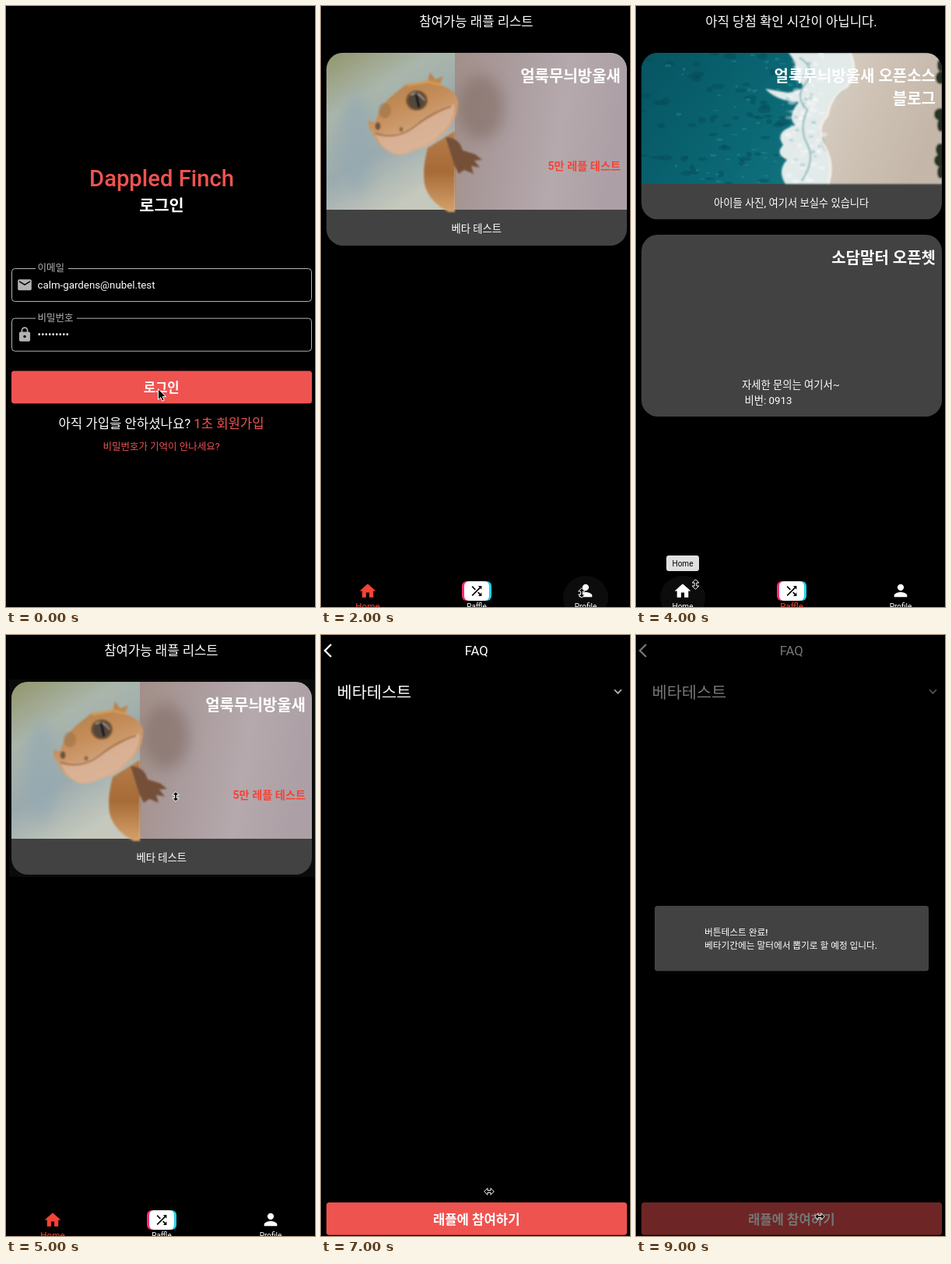
Recreate the animation shown at these times as an HTML page. Size 397 by 770 pixels, loop 10 s.

```html
<!DOCTYPE html>
<html lang="ko">
<head>
<meta charset="utf-8">
<title>Raffle app</title>
<style>
  html, body { margin: 0; width: 100%; height: 100%; overflow: hidden; background: #000; }
  svg { display: block; width: 100%; height: 100%; }
  text { font-family: Roboto, "Noto Sans CJK KR", "Noto Sans CJK", sans-serif; white-space: pre; }
</style>
</head>
<body>
<svg id="stage" viewBox="0 0 397 770"></svg>
<script>
const RED = '#ef5350', ACCENT = '#f44336', GRAY = '#424242', HINT = '#b3b3b3';
const APP = 'Dappled Finch', EMAIL = 'calm-gardens@nubel.test';
const BIRD = '얼룩무늬방울새', CHAT = '소담말터';

const ICONS = {
  mail: 'M20 4H4c-1.1 0-2 .9-2 2v12c0 1.1.9 2 2 2h16c1.1 0 2-.9 2-2V6c0-1.1-.9-2-2-2zm0 4l-8 5-8-5V6l8 5 8-5v2z',
  lock: 'M18 8h-1V6A5 5 0 0 0 7 6v2H6c-1.1 0-2 .9-2 2v10c0 1.1.9 2 2 2h12c1.1 0 2-.9 2-2V10c0-1.1-.9-2-2-2zm-6 9a2 2 0 1 1 0-4 2 2 0 0 1 0 4zm3.1-9H8.9V6a3.1 3.1 0 0 1 6.2 0z',
  home: 'M10 20v-6h4v6h5v-8h3L12 3 2 12h3v8z',
  person: 'M12 12a4 4 0 1 0 0-8 4 4 0 0 0 0 8zm0 2c-2.67 0-8 1.34-8 4v2h16v-2c0-2.66-5.33-4-8-4z',
  shuffle: 'M10.6 9.2 5.4 4 4 5.4l5.2 5.2zM14.5 4l2 2L4 18.6 5.4 20 18 7.5l2 2V4zm.3 9.4-1.4 1.4 3.1 3.1-2 2.1H20v-5.5l-2 2z'
};

const rect = (x, y, w, h, fill, r = 0, extra = '') =>
  `<rect x="${x}" y="${y}" width="${w}" height="${h}" rx="${r}" fill="${fill}" ${extra}/>`;
const path = (d, fill, extra = '') => `<path d="${d}" fill="${fill}" ${extra}/>`;
const line = (d, color, width) => path(d, 'none', `stroke="${color}" stroke-width="${width}"`);
const oval = (x, y, rx, ry, fill, extra = '') =>
  `<ellipse cx="${x}" cy="${y}" rx="${rx}" ry="${ry}" fill="${fill}" ${extra}/>`;
const icon = (name, cx, cy, scale, fill) =>
  path(ICONS[name], fill, `transform="translate(${cx} ${cy}) scale(${scale}) translate(-12 -12)"`);

function text(x, y, size, str, { fill = '#fff', weight = 400, anchor = 'middle' } = {}) {
  return `<text x="${x}" y="${y}" font-size="${size}" fill="${fill}" font-weight="${weight}" text-anchor="${anchor}">${str}</text>`;
}
const left = { anchor: 'start' };
const heading = (y, str) => text(385, y, 20, str, { anchor: 'end', weight: 700 });
const appBar = str => text(199.5, 26, 16.7, str);
const button = (y, str, fill = RED) =>
  rect(7, y, 386, 41.7, fill, 3.5) + text(199.7, y + 27.6, 16.7, str, { weight: 700 });

// Mouse pointers
const pointer = (d, x, y, turn = 0) =>
  path(d, '#000', `stroke="#fff" stroke-linejoin="round" transform="translate(${x} ${y}) rotate(${turn})"`);
const arrow = (x, y) => pointer('M0 0V14l3.3-3 2 4.7 2.4-1L5.7 10H10Z', x, y);
const resize = (x, y, turn) => pointer('M0-6.3 4.3-2H1.3V2H4.3L0 6.3-4.3 2h3V-2h-3Z', x, y, turn);

function nav(selected, hovered) {
  const xs = { Home: 60, Raffle: 200, Profile: 340 };
  const color = name => name === selected ? ACCENT : '#fff';
  const halo = hovered ? oval(xs[hovered], 758, 29, 28, '#0c0c0c') : '';
  const labels = Object.keys(xs).map(name =>
    text(xs[name], 773, name === selected ? 11.7 : 10, name, { fill: color(name) })).join('');
  return halo + icon('home', 60, 749.5, 1.04, color('Home')) + icon('person', 340, 749, 1.04, color('Profile')) +
    rect(181, 737, 30, 25, '#fa2d6c', 6) + rect(189, 737, 30, 25, '#20d3ea', 6) +
    rect(184, 737, 32, 25, '#fff', 6) + icon('shuffle', 200, 749.5, .8, '#000') + labels;
}

const card = (y, h, content) =>
  `<clipPath id="card${y}">${rect(7, y, 386, h, '#000', 21)}</clipPath>` +
  `<g clip-path="url(#card${y})">${rect(7, y, 386, h, GRAY)}${content}</g>`;

const gradient = (id, dir, ...colors) => `<linearGradient id="${id}" ${dir}>` +
  colors.map((c, i) => `<stop offset="${i / (colors.length - 1)}" stop-color="${c}"/>`).join('') + '</linearGradient>';

const DEFS = '<defs>' +
  gradient('leafy', 'x2=".5" y2="1"', '#92956b', '#aab6ab', '#9babae', '#c5c8bc') +
  gradient('wall', 'x2="1" y2=".15"', '#a28f88', '#aa9b9d', '#b5a9ad', '#aca0a6') +
  gradient('skin', 'x2=".4" y2="1"', '#a87a46', '#c58d59', '#d9b090') +
  gradient('belly', 'x2="0" y2="1"', '#b77d49', '#a66b37', '#d6a16c') +
  gradient('sea', 'x2="1" y2=".3"', '#075462', '#0a6874', '#17808a') +
  gradient('sand', 'x2="1" y2=".4"', '#d9d1c7', '#cec2b5', '#c4b7a9') +
  '<filter id="soft" x="-50%" y="-50%" width="200%" height="200%"><feGaussianBlur stdDeviation="9"/></filter>' +
  '<filter id="slight"><feGaussianBlur stdDeviation=".9"/></filter></defs>';

const geckoPhoto = rect(7, 60, 166, 201, 'url(#leafy)') +
  oval(45, 175, 20, 65, '#94a9b2', 'filter="url(#soft)" opacity=".7"') +
  rect(172, 60, 221, 201, 'url(#wall)') +
  oval(205, 130, 30, 42, '#846f69', 'filter="url(#soft)" opacity=".65"') +
  '<g filter="url(#slight)">' +
  path('M137 182Q130 208 133 228Q138 250 164 264H172V160Z', 'url(#belly)') +
  path('M160 168Q177 168 182 185L198 190 207 197 197 198 204 207 193 205 196 215 184 210 177 215 171 203Z', '#765038') +
  path('M61 147L70 149Q75 127 95 112L110 100 137 97 140 85 147 94 157 90 153 101Q172 107 176 122Q176 148 157 164Q143 180 122 184Q101 196 88 187Q74 181 69 168L61 155Z', 'url(#skin)') +
  path('M71 166Q98 173 128 150L171 126Q173 148 152 164Q140 178 121 182Q99 194 87 185Q77 180 71 166Z', '#dbb49a', 'opacity=".8"') +
  line('M70 163Q99 174 126 150Q144 136 167 129', '#98653f', 1.6) +
  line('M110 102L138 97L154 101', '#d79a4e', 3) +
  oval(82, 134, 8, 10, '#986d43', 'opacity=".5"') + oval(73, 154, 3.5, 5, '#70523a') +
  oval(103, 158, 2.4, 3, '#8c6245') +
  oval(123, 121, 14, 13, '#7c552f') + oval(123, 121, 11, 11, '#51463d') +
  line('M115 114Q124 108 133 121', '#a9a093', 1.5) + line('M122 112L126 130', '#14100d', 3) +
  '</g>';

function beachPhoto() {
  let seed = 11;
  const random = () => (seed = seed * 16807 % 2147483647) / 2147483647;
  const spots = (n, x, w, color, size) => Array.from({ length: n }, () =>
    oval(x + random() * w, 60 + random() * 168, size * (1 + random() * 2), size * (.5 + random()), color, 'opacity=".45"')).join('');
  const trees = [76, 92, 139, 153, 184, 198, 213].map((y, i) =>
    oval(391, y, 4 + i % 3 * 2, 8, '#253020')).join('');
  return rect(7, 60, 386, 168, 'url(#sea)') + spots(65, 7, 185, '#064b57', 3) + spots(45, 40, 160, '#298b94', 1.5) +
    '<g filter="url(#slight)">' +
    path('M270 60H393V228H238Q252 190 235 158Q246 123 270 105Z', 'url(#sand)') +
    path('M196 60Q211 78 202 93Q230 105 195 111L166 106Q181 122 209 123Q193 143 205 153Q177 160 189 178Q178 190 194 197Q181 211 192 228H247Q253 202 240 180Q229 158 245 139Q248 115 271 103Q284 82 274 60Z', '#e2eaea') +
    spots(60, 193, 48, '#fff', 2) + spots(26, 193, 44, '#6fa9ad', 1.4) +
    line('M210 66Q233 81 218 99T220 133Q209 157 220 177T213 224', '#88b5b8', 2) +
    line('M275 60Q286 84 271 103Q249 116 246 140Q230 157 242 180Q255 202 247 228', '#f5f1eb', 3) + trees + '</g>';
}

function field(y, label, gapEnd, iconName, value) {
  return rect(7.5, y, 385, 42, 'none', 4, `stroke="${HINT}"`) + rect(38, y - 2, gapEnd - 38, 4, '#000') +
    text(40.5, y + 3.8, 12.5, label, { anchor: 'start', fill: HINT }) +
    icon(iconName, 24, y + 20.7, .88, HINT) + text(40.5, y + 25, 13.3, value, left);
}

const brand = y => text(200, y, 29.2, APP, { fill: RED, weight: 500 });

const login = brand(231.3) + text(200, 262.7, 20.8, '로그인', { weight: 700 }) +
  field(336.5, '이메일', 80, 'mail', EMAIL) + field(400.2, '비밀번호', 91, 'lock', '•••••••••') +
  button(467.5, '로그인') +
  text(199.5, 541.3, 16.7, `아직 가입을 안하셨나요? <tspan fill="${RED}">1초 회원가입</tspan>`) +
  text(199.5, 569, 12.5, '비밀번호가 기억이 안나세요?', { fill: RED }) + arrow(195.5, 490.5);

const raffleList = appBar('참여가능 래플 리스트') +
  card(60, 247, geckoPhoto + heading(97, BIRD) +
    text(385, 210.3, 14.2, '5만 레플 테스트', { fill: ACCENT, weight: 700, anchor: 'end' }) +
    text(199.7, 290.3, 13.3, '베타 테스트'));
const home = hovered => raffleList + nav('Home', hovered);

const profile = brand(294.3) + text(200, 333.8, 20.8, EMAIL, { weight: 500 }) +
  button(405.5, 'Logout') + nav('Profile', 'Profile') + resize(282, 749);

const raffle = appBar('아직 당첨 확인 시간이 아닙니다.') +
  card(60, 213.5, beachPhoto() + heading(97, BIRD + ' 오픈소스') + heading(126, '블로그') +
    text(199.7, 257, 13.3, '아이들 사진, 여기서 보실수 있습니다')) +
  card(293, 233, heading(330, CHAT + ' 오픈쳇') + text(136, 490, 13.3, '자세한 문의는 여기서~', left) +
    text(139.5, 509.5, 13.3, '비번: 0913', left)) +
  nav('Raffle', 'Home') + rect(39, 704, 42, 20, '#e0e0e0', 3.3) +
  text(60, 717.8, 10, 'Home', { fill: '#000' }) + resize(76.5, 741);

const faq = fill => line('M13 12L5 20L13 28', '#fff', 2.3) + text(199.7, 26, 16.7, 'FAQ') +
  text(20.5, 81, 20.8, '베타테스트', left) + line('M377 70L381.5 74.7L386 70', HINT, 1.8) +
  button(727, '래플에 참여하기', fill);

const dialog = rect(0, 0, 397, 770, '#000', 0, 'opacity=".54"') + rect(24, 347, 352, 83.5, GRAY, 3.5) +
  text(88, 385.3, 11.7, '버튼테스트 완료!', { ...left, weight: 500 }) +
  text(88, 402, 11.7, '베타기간에는 말터에서 뽑기로 할 예정 입니다.', { ...left, weight: 500 });

// One scene per second
const scenes = [
  login,
  home() + resize(237, 250),
  home('Profile') + resize(335, 752),
  profile,
  raffle,
  rect(4, 57, 393, 253, '#0a0a0a') + home() + resize(218, 207),
  home() + resize(217, 600),
  faq() + resize(216, 713, 90),
  faq('#f0615e') + resize(236, 745, 90),
  faq() + dialog + resize(236, 745, 90)
];

const stage = document.getElementById('stage');
const start = performance.now();
let shown = -1;
function draw() {
  const index = Math.floor((performance.now() - start) / 1000) % scenes.length;
  if (index !== shown) {
    shown = index;
    stage.innerHTML = DEFS + scenes[index];
  }
  requestAnimationFrame(draw);
}
draw();
</script>
</body>
</html>
```
